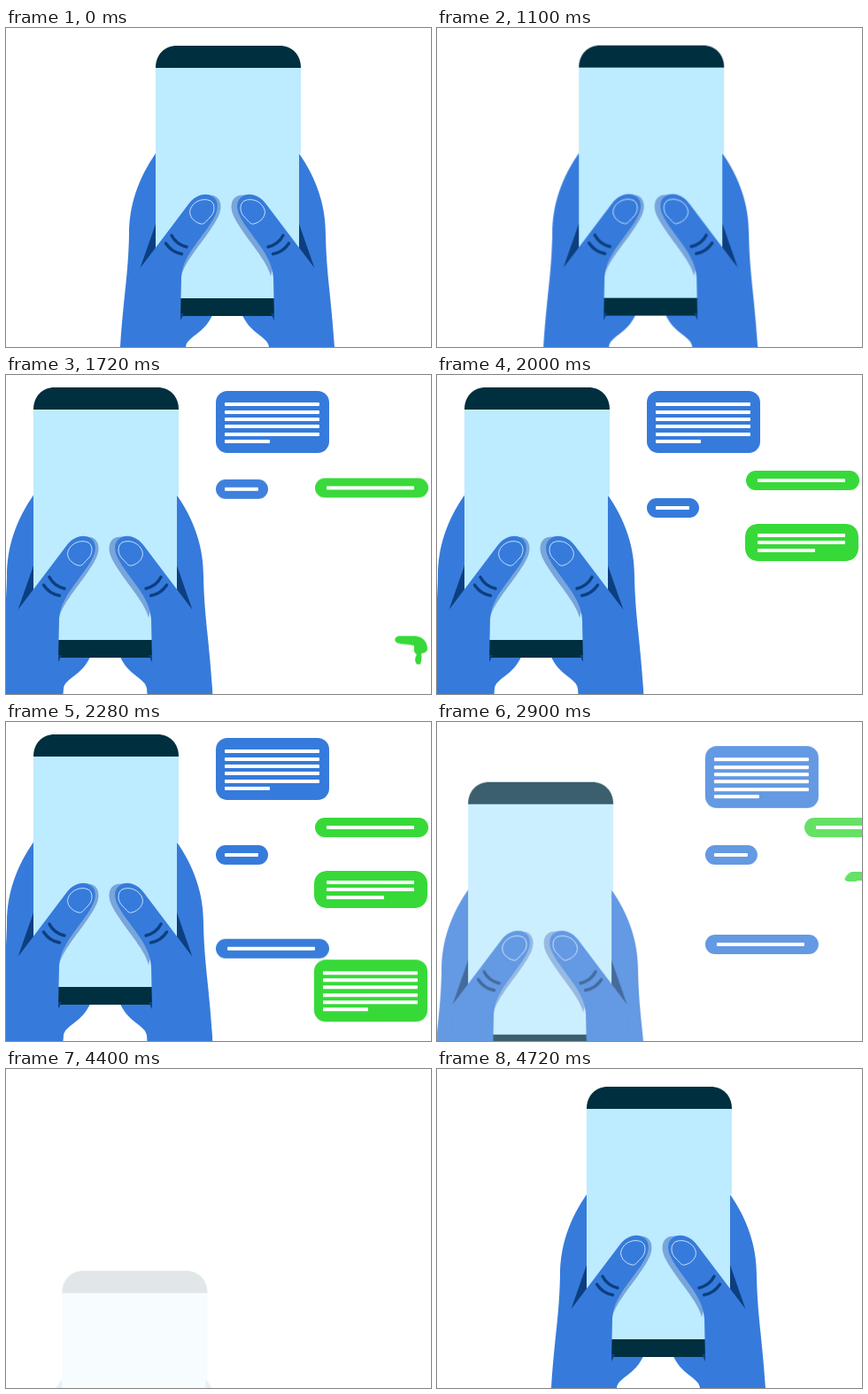
An HTML page for the animation above (6100 ms loop, 480 px wide and 360 px high).

```html
<!DOCTYPE html>
<html lang="en">
<head>
<meta charset="utf-8">
<title>Phone chat</title>
<style>
:root { --loop: 6100ms; }
html, body { margin: 0; width: 100%; height: 100%; overflow: hidden; background: #fff; }
#stage { position: relative; width: 480px; height: 360px; overflow: hidden; }

#phone {
  position: absolute; left: 0; top: 0; overflow: visible;
  animation: travel var(--loop) linear infinite, dim var(--loop) linear infinite;
}
.skin { fill: #367bdb; }
.dark { fill: #002f40; }
.shade { fill: #0d3f80; }
.glow { fill: #78a5da; }
.crease { fill: none; stroke: #0d3f80; stroke-width: 3.4; stroke-linecap: round; }
.nail { fill: none; stroke: #c9dff7; stroke-width: 1; }

/* quadratic ease-out: .3333, .6667, .6667, 1; quadratic ease-in: .3333, 0, .6667, .3333 */
@keyframes travel {
  0% { transform: none; }
  17.869% { transform: none; animation-timing-function: cubic-bezier(.3333, .6667, .6667, 1); }
  23.443% { transform: translate(-138px, -6px); }
  45.164% { transform: translate(-138px, -6px); animation-timing-function: cubic-bezier(.3333, 0, .6667, .3333); }
  50.82% { transform: translate(-115px, 294px); }
  71.803% { transform: translate(-120px, 236px); animation-timing-function: cubic-bezier(.3333, .6667, .6667, 1); }
  77.377%, 100% { transform: none; }
}
@keyframes dim {
  0% { opacity: 1; }
  45.164% { opacity: 1; animation-timing-function: cubic-bezier(.333, .07, .667, .4); }
  50.82% { opacity: 0; }
  71.803% { opacity: 0; animation-timing-function: cubic-bezier(.3333, .6667, .6667, 1); }
  77.377%, 100% { opacity: 1; }
}

.bubble {
  position: absolute;
  animation: arrive var(--loop) var(--start) linear infinite both;
}
.card {
  position: absolute; inset: 0;
  animation: leave var(--loop) var(--early) linear infinite, vanish var(--loop) linear infinite;
}
.card i { position: absolute; height: 4px; background: #fff; border-radius: 1px; }
.drip {
  animation: arrive var(--loop) var(--start) linear infinite both,
    drip var(--loop) step-end infinite;
}
.drip .card {
  animation: leave var(--loop) var(--early) linear infinite, vanish var(--loop) linear infinite,
    shrink var(--loop) linear infinite;
}

@keyframes arrive {
  0% {
    transform: translateY(var(--dy)); opacity: var(--o);
    animation-timing-function: cubic-bezier(.3333, .6667, .6667, 1);
  }
  5.574% { transform: none; opacity: 1; }
  49.9% { transform: none; opacity: 1; }
  50%, 100% { transform: translateY(var(--dy)); opacity: 0; }
}
@keyframes leave {
  0% { transform: none; }
  45.164% { transform: none; animation-timing-function: cubic-bezier(.3333, 0, .6667, .3333); }
  50.82%, 100% { transform: translate(368px, var(--drop)); }
}
@keyframes vanish {
  0% { opacity: 1; }
  45.164% { opacity: 1; animation-timing-function: cubic-bezier(.333, .07, .667, .4); }
  50.82%, 100% { opacity: 0; }
}
@keyframes drip {
  0% {
    clip-path: path("M96 0H117C124 0 128 4 128 10V14C128 18 125 19 121 20C122 24 121 29 120 32H116C113 28 114 24 116 21C113 19 112 16 113 11C107 9 99 10 94 8C90 6 90 1 96 0Z");
    animation-timing-function: step-end;
  }
  28.5%, 100% { clip-path: none; }
}
@keyframes shrink {
  0%, 44.44% { clip-path: inset(0 0 0 0 round 14px); }
  47.5%, 100% { clip-path: inset(1px 0 30px 0 round 6px); }
}
</style>
</head>
<body>
<div id="stage">
  <svg id="phone" width="480" height="360" viewBox="0 0 480 360">
    <defs>
      <g id="palm">
        <path class="skin" d="M170 140C149 170 139 200 139 233C138 280 133 300 129 360L128 384H201L203 360C204 348 224 346 234 322V290H170Z"/>
        <path class="shade" d="M169 221L151.500 271L174 245Z"/>
      </g>
      <path id="glow" class="glow" d="M210 198C216 189 230 186 238 191C244 196 244 206 238 216C226 238 202 262 198 280L190 250Z"/>
      <g id="thumb">
        <path class="shade" d="M196 322H201L197 330Z"/>
        <path class="skin" d="M151.500 271L206 199C213 189 225 185 233 190C241 195 240 205 235 214C224 235 199 256 198 282L197 330L160 332L150 300Z"/>
        <path class="nail" d="M208 205C211 196 222 191 231 195C237 199 236 209 230 214C226 218 224 222 220 221C212 219 206 212 208 205Z"/>
        <path class="crease" d="M187 234Q192 244 204 247M180.500 243Q187 253 198.500 255"/>
      </g>
    </defs>
    <use href="#palm"/>
    <use href="#palm" transform="matrix(-1 0 0 1 500 0)"/>
    <path fill="#bdebff" d="M169 44H333V141L331 143V306H169Z"/>
    <path class="dark" d="M169 45C169 30 179 20 193 20H309C323 20 333 30 333 45Z"/>
    <path class="dark" d="M190 305H310V325H190Z"/>
    <use href="#glow"/>
    <use href="#glow" transform="matrix(-1 0 0 1 497 0)"/>
    <use href="#thumb"/>
    <use href="#thumb" transform="matrix(-1 0 0 1 500 0)"/>
  </svg>
</div>
<script>
const stage = document.getElementById('stage');
const blue = '#367bdb', green = '#37d939';

const big = { w: 128, h: 70, r: 13, x: 10, y: 13, line: 107, rows: 6, last: 51 };
const mid = { w: 128, h: 42, r: 14, x: 14, y: 11, line: 99, rows: 3, last: 65 };
const pill = { w: 128, h: 22, r: 11, x: 13, y: 9, line: 99, rows: 1, last: 99 };
const tiny = { ...pill, w: 59, x: 10, last: 38 };

function bubble(kind, color, x, y, start, dy, opts = {}) {
  const { early = 0, drop = 0, o = 0, cls = '' } = opts;
  const box = document.createElement('div');
  const card = document.createElement('div');
  box.className = 'bubble ' + cls;
  box.style.cssText = `left:${x}px;top:${y}px;width:${kind.w}px;height:${kind.h}px;` +
    `--start:${start}ms;--dy:${dy}px;--early:${-early}ms;--drop:${drop}px;--o:${o}`;
  card.className = 'card';
  card.style.cssText = `background:${color};border-radius:${kind.r}px`;
  for (let i = 0; i < kind.rows; i++) {
    const row = document.createElement('i');
    const width = i === kind.rows - 1 ? kind.last : kind.line;
    row.style.cssText = `left:${kind.x}px;top:${kind.y + i * 8.3}px;width:${width}px`;
    card.append(row);
  }
  box.append(card);
  stage.append(box);
}

bubble(big, blue, 237, 18.4, 1090, -571, { drop: 51 });
bubble(pill, green, 349, 108, 1425, 500);
bubble(tiny, blue, 237, 139.3, 1451, -500);
bubble(mid, green, 348, 168, 1552, 500, { early: 44, o: 1, cls: 'drip' });
bubble(pill, blue, 236.5, 239.8, 1978, 400);
bubble(big, green, 348, 266.8, 1960, 400, { early: 65 });
</script>
</body>
</html>
```
